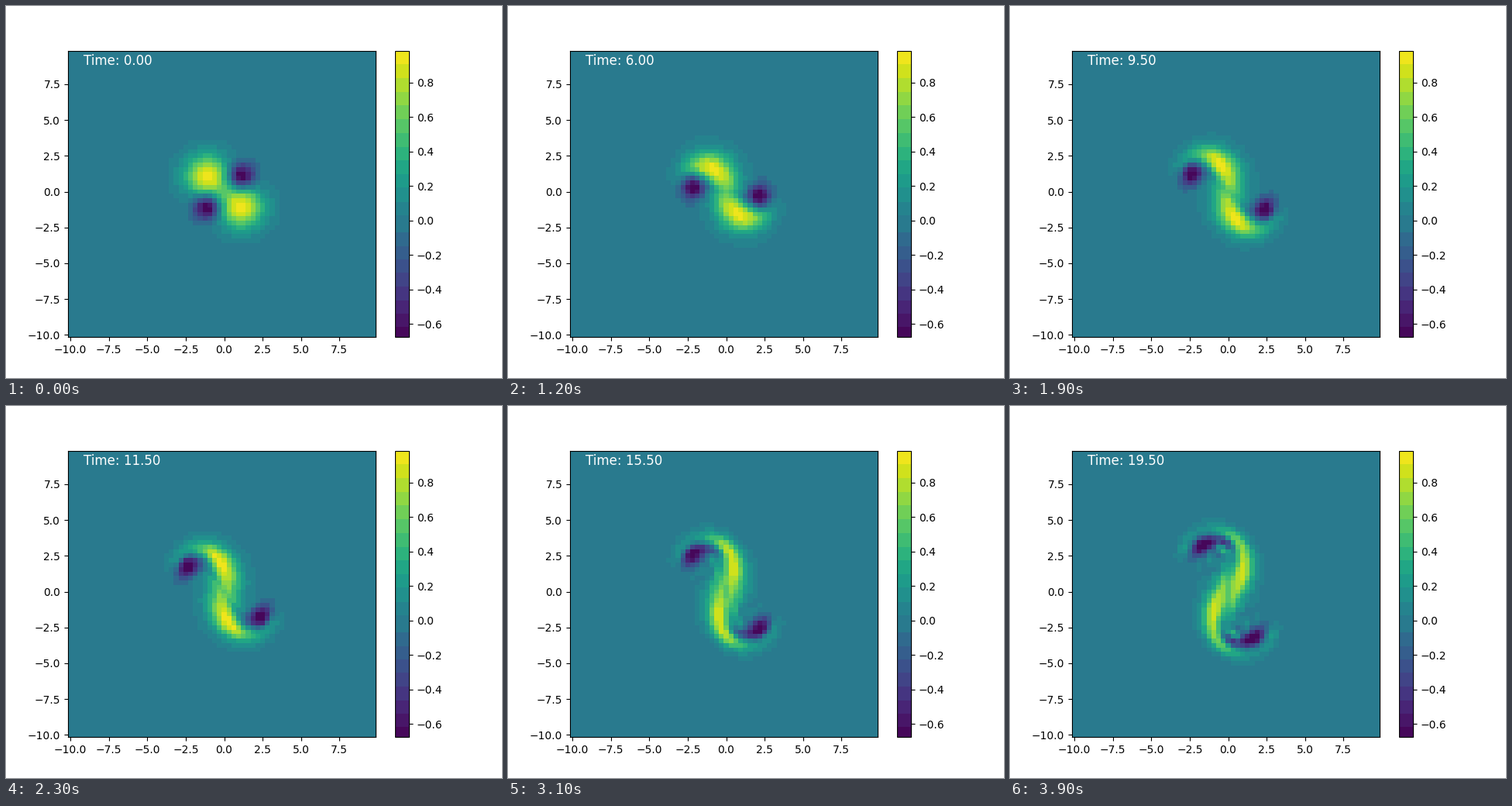
A matplotlib script that plays this animation: 640 px wide and 480 px high, repeating every 4000 ms.

```python
import numpy as np
import matplotlib.pyplot as plt
from matplotlib.animation import FuncAnimation
from matplotlib.colors import ListedColormap

FRAMES = 40
FRAME_TIME = 0.5
RATE = 0.8          # flow time per unit of displayed time
SUBSTEPS = 4
NU = 0.001
N, SIZE = 64, 20.0
DX = SIZE / N
VMIN, VMAX = -0.677, 0.986

x = -SIZE / 2 + DX * np.arange(N)
X, Y = np.meshgrid(x, x)
k = 2 * np.pi * np.fft.fftfreq(N, DX)
K2 = k[None, :] ** 2 + k[:, None] ** 2
K2[0, 0] = 1.0


def gauss(cx, cy, sharpness):
    return np.exp(-sharpness * ((X - cx) ** 2 + (Y - cy) ** 2))


def ddx(f, axis):
    return (np.roll(f, -1, axis) - np.roll(f, 1, axis)) / (2 * DX)


def laplacian(f):
    total = sum(np.roll(f, s, axis) for s in (-1, 1) for axis in (0, 1))
    return (total - 4 * f) / DX ** 2


def stream(w):
    psi_hat = -np.fft.fft2(w) / K2
    psi_hat[0, 0] = 0
    return np.fft.ifft2(psi_hat).real


def rate(w):
    psi = stream(w)
    bracket = ddx(psi, 1) * ddx(w, 0) - ddx(psi, 0) * ddx(w, 1)
    return bracket + NU * laplacian(w)


def rk4(w, dt):
    a = rate(w)
    b = rate(w + dt / 2 * a)
    c = rate(w + dt / 2 * b)
    d = rate(w + dt * c)
    return w + dt / 6 * (a + 2 * b + 2 * c + d)


def simulate():
    c = 1.08
    w = gauss(-c, c, 0.5) + gauss(c, -c, 0.5)
    w -= 0.87 * (gauss(c, c, 1.25) + gauss(-c, -c, 1.25))
    history = [w]
    for _ in range(FRAMES - 1):
        for _ in range(SUBSTEPS):
            w = rk4(w, FRAME_TIME * RATE / SUBSTEPS)
        history.append(w)
    return history


def banded_viridis(entries=512):
    """Viridis in flat bands, with one band holding the zero level."""
    edges = np.concatenate([[VMIN], np.linspace(-0.62, -0.069, 8),
                            np.linspace(0.03, 0.908, 12), [VMAX]])
    mids = (edges[:-1] + edges[1:]) / 2
    mids[np.searchsorted(edges, 0) - 1] = 0
    values = np.linspace(VMIN, VMAX, entries)
    band = np.clip(np.digitize(values, edges) - 1, 0, len(mids) - 1)
    return ListedColormap(plt.cm.viridis((mids[band] - VMIN) / (VMAX - VMIN)))


fields = simulate()

fig, ax = plt.subplots(figsize=(6.4, 4.8), dpi=100)
mesh = ax.pcolormesh(x, x, fields[0], cmap=banded_viridis(),
                     vmin=VMIN, vmax=VMAX, shading="nearest")
fig.colorbar(mesh, ax=ax)
label = ax.text(0.05, 0.95, "", transform=ax.transAxes,
                color="white", fontsize=12)


def update(i):
    mesh.set_array(fields[i])
    label.set_text(f"Time: {i * FRAME_TIME:.2f}")
    return mesh, label


anim = FuncAnimation(fig, update, frames=FRAMES, interval=100,
                     repeat=True, repeat_delay=0)
plt.show()
```
